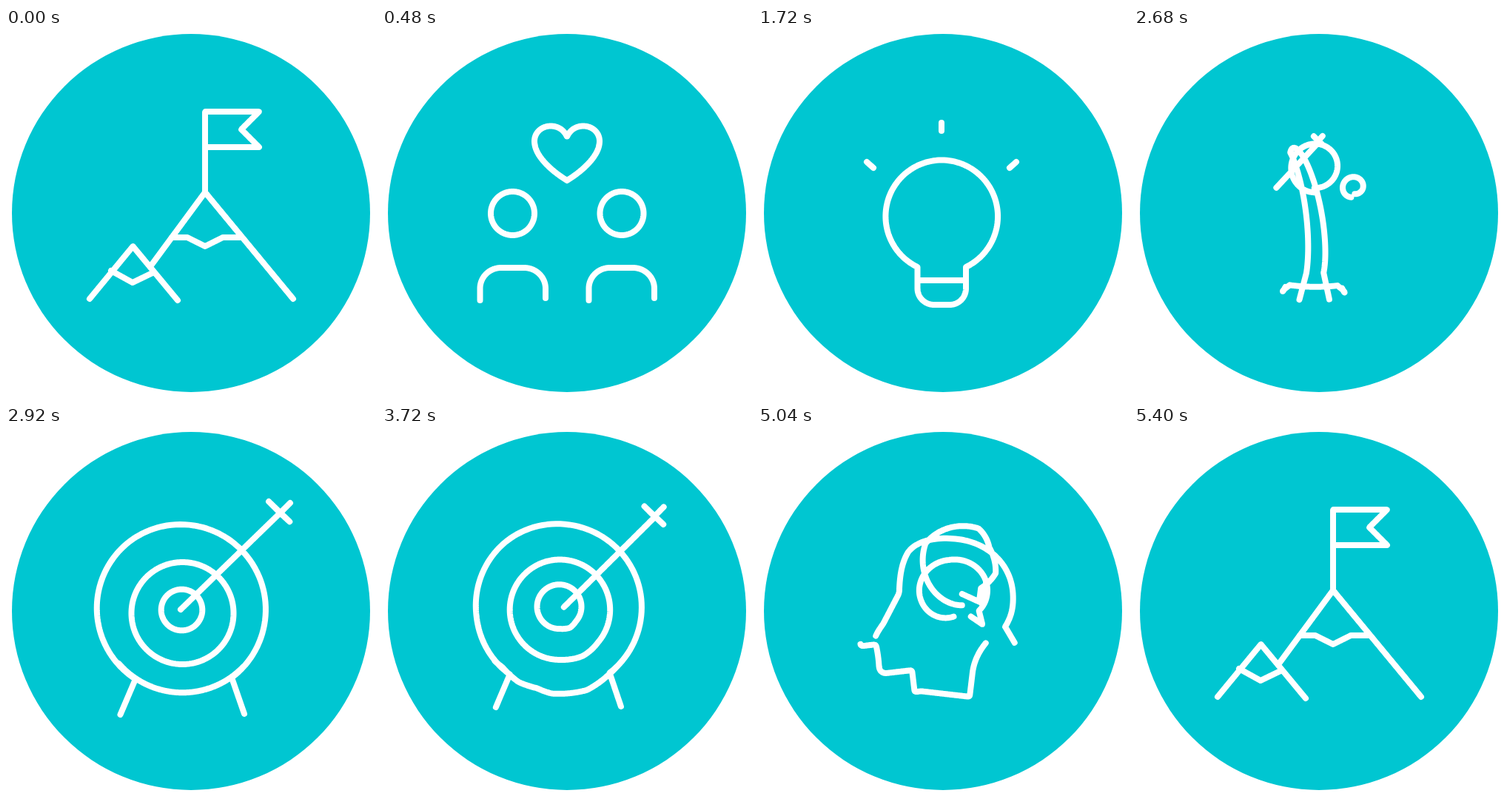
These frames come from a looping animation (500 px wide and 500 px high, 6.16 s). An HTML page:

```html
<!DOCTYPE html>
<html lang="en">
<head>
<meta charset="utf-8">
<title>Morphing icons</title>
<style>
  html, body { margin: 0; width: 100%; height: 100%; overflow: hidden; background: #fff; }
  svg { display: block; width: 100%; height: 100%; }
</style>
</head>
<body>
<svg viewBox="0 0 500 500">
  <circle cx="250" cy="250" r="242" fill="#00c6d1"/>
  <path id="icon" fill="none" stroke="#fff" stroke-width="8" stroke-linecap="round" stroke-linejoin="round"/>
</svg>
<script>
const LOOP = 6160, STEP = 40, POINTS = 240;

// Rings start at the bottom and run clockwise.
const ring = (x, y, r) =>
  `M${x} ${y + r}a${r} ${r} 0 0 1 0 ${-2 * r}a${r} ${r} 0 0 1 0 ${2 * r}`;
const body = x =>
  `M${x} 368v-16a28.5 28 0 0 1 28.5 -28h31a29 28 0 0 1 29 28v13`;
const bubble = 'M278 249A54.5 54.5 0 1 1 297 238.5L301 263Z';

// Every icon has five strokes; each M starts a piece that gets an equal share of points.
const mountain = [
  'M196 321L269 222M269 222L388 366',
  'M113 366L171.5 295L232 368',
  'M269 222V113H342L318 137L342 161H269',
  'M142 328L171 344L200 330',
  'M224 283H245L269 295L293 283H317'
];
const people = [
  body(279.5),
  body(132.5),
  'M250 206C232 195 206 174 206 153C206 141 216 132.5 228 132.5C240 132.5 247 140 250 147' +
    'C253 140 260 132.5 272 132.5C284 132.5 294 141 294 153C294 174 268 195 250 206Z',
  ring(176.5, 250.5, 29.5),
  ring(324, 250.5, 29.5)
];
const bulb = [
  'M281 348V323M281 323A76 76 0 0 0 248 178.5M248 178.5A76 76 0 0 0 215.5 323M215.5 323V348',
  'M248 374H238A22.5 22 0 0 1 215.5 352V341M215.5 341H281M281 341V352A22 22 0 0 1 259 374H248',
  'M248 139V128',
  'M156 189L147 181',
  'M340 189L349 181'
];
const target = [
  'M154.5 390L175 342M175 342A114 114 0 0 1 167 156M167 156A115 115 0 0 1 305 340M305 340L322 389',
  'M152.5 321A114 114 0 0 0 321 325',
  ring(238.5, 253, 69),
  'M236 248L370.5 117.5L355 102L383.5 129.5L370.5 117.5L384 104',
  ring(237.5, 248.5, 27.8)
];
const head = [
  'M147 271Q146 269 148 266M148 266L169 223Q172 217 171 211C170 190 171 170 181 153' +
    'M181 153C194 132 222 122 257 122C315 122 354 160 354 209C354 237 345 252 336 264M336 264L333 268.5',
  'M147 271Q147 275 152 275H168Q172 275 172.5 280Q174 300 173 318Q172 335 186 335H222Q226 335 226 339' +
    'V376Q226 379.5 230 379.5H312Q316 379.5 316 376V330C316 305 324 284 333 268.5',
  bubble,
  'M354 209C354 194.3 350.5 180.6 344 168.6',
  bubble
];

const probe = document.createElementNS('http://www.w3.org/2000/svg', 'path');

function sample(d) {
  const pieces = d.split(/(?=M)/), count = POINTS / pieces.length;
  return pieces.flatMap(piece => {
    probe.setAttribute('d', piece);
    const length = probe.getTotalLength();
    return Array.from({ length: count }, (_, i) =>
      probe.getPointAtLength(length * i / (count - 1)));
  });
}

const icons = [mountain, people, bulb, target, head].map(icon => icon.map(sample));
const morphs = [[40, 12], [1280, 12], [2520, 11], [3720, 12], [4960, 12]]; // start, steps

function draw(time) {
  let from = 0, p = 0;
  morphs.forEach(([start, steps], i) => {
    if (time < start) return;
    from = i;
    p = Math.min(1, (Math.floor((time - start) / STEP) + 1) / steps);
  });
  const next = icons[(from + 1) % icons.length];
  const mix = (a, b) => (a + (b - a) * p).toFixed(2);
  const d = icons[from].map((stroke, s) => 'M' + stroke.map((a, i) => {
    const b = next[s][i];
    return mix(a.x, b.x) + ' ' + mix(a.y, b.y);
  }).join('L'));
  document.getElementById('icon').setAttribute('d', d.join(''));
}

const begin = performance.now();
function tick() {
  draw((performance.now() - begin) % LOOP);
  requestAnimationFrame(tick);
}
tick();
</script>
</body>
</html>
```
